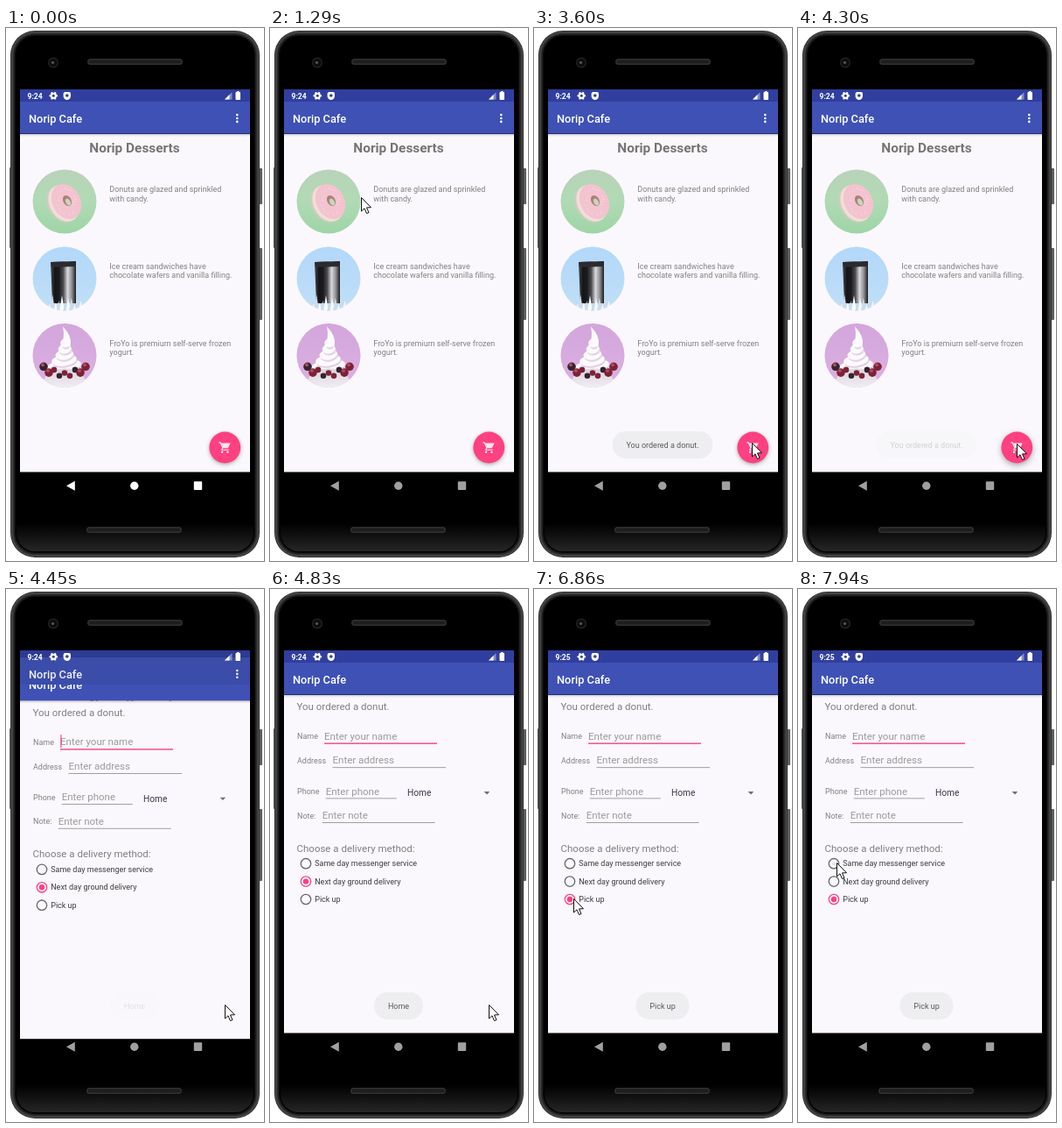
An HTML page with a canvas that plays this animation: 295 px wide and 608 px high, repeating every 8 s.

```html
<!DOCTYPE html>
<html lang="en">
<head>
<meta charset="utf-8">
<title>Dessert order</title>
<style>
html, body { margin: 0; width: 100%; height: 100%; overflow: hidden; background: #fff; }
canvas { display: block; width: 295px; height: 608px; }
</style>
</head>
<body>
<canvas id="c"></canvas>
<script>
const W = 295, H = 608, LOOP = 8000, TAU = Math.PI * 2;
const cv = document.getElementById('c'), g = cv.getContext('2d');
const dpr = window.devicePixelRatio || 1;
cv.width = W * dpr;
cv.height = H * dpr;

const PINK = '#ff4081', PAGE = '#faf8fc', GREY = '#808080', HINT = '#9b9b9b', NAVY = '#303f9f';
const ramp = (t, a, b) => Math.min(1, Math.max(0, (t - a) / (b - a)));
const mix = (a, b, k) => a + (b - a) * k;
const easeOut = k => 1 - (1 - k) ** 2.1;
const grey = v => `rgb(${v},${v},${v})`;

function rect(x, y, w, h, c) { g.fillStyle = c; g.fillRect(x, y, w, h); }

function round(x, y, w, h, r, c) {
  g.beginPath();
  g.roundRect(x, y, w, h, r);
  g.fillStyle = c;
  g.fill();
}

function oval(x, y, rx, ry, a, c) {
  g.beginPath();
  g.ellipse(x, y, rx, ry, a, 0, TAU);
  g.fillStyle = c;
  g.fill();
}

const dot = (x, y, r, c) => oval(x, y, r, r, 0, c);

function poly(pts, c) {
  g.beginPath();
  for (let i = 0; i < pts.length; i += 2) g.lineTo(pts[i], pts[i + 1]);
  g.closePath();
  g.fillStyle = c;
  g.fill();
}

function text(s, x, y, size, c, weight = 400, align = 'left') {
  g.font = `${weight} ${size}px Roboto, sans-serif`;
  g.textAlign = align;
  g.fillStyle = c;
  g.fillText(s, x, y);
}

function shade(x0, y0, x1, y1, ...cols) {
  const s = g.createLinearGradient(x0, y0, x1, y1);
  cols.forEach((c, i) => s.addColorStop(i / (cols.length - 1), c));
  return s;
}

function at(x, y, paint, scale = 1) {
  g.save();
  g.translate(x, y);
  g.scale(scale, scale);
  paint();
  g.restore();
}

function drawSpeaker(x, y) {
  round(x, y, 109, 7, 3.5, '#303030');
  round(x + 1.5, y + 1.5, 106, 4, 2, '#1e1e1e');
}

function drawPhone() {
  rect(0, 0, W, H, '#fff');
  round(288, 160, 5, 41, 1, '#5c6061');
  round(288, 251, 5, 82, 1, '#5c6061');
  round(4, 159, 4, 92, 1, '#5c6061');
  // rim fading into the black face
  for (let i = 0; i < 7; i++)
    round(5 + i, 3 + i, 285 - 2 * i, 601 - 2 * i, 28 - i, grey(i ? 90 - 15 * i : 48));
  round(12, 10, 271, 587, 21, shade(0, 565, 0, 597, '#000', '#262626'));
  drawSpeaker(93, 35);
  drawSpeaker(92, 569);
  dot(54, 39.5, 6, '#222');
  dot(54, 39.5, 4.6, '#0c0c0e');
  dot(53.5, 39.5, 1.8, '#4a4c52');
  rect(16, 70, 263, 470, '#000');
}

function drawBar(menu) {
  rect(16, 121, 263, 385.5, PAGE);
  rect(16, 120, 263, 4, shade(0, 120, 0, 124, 'rgba(0,0,0,.22)', 'rgba(0,0,0,0)'));
  rect(16, 60, 263, 24, NAVY);
  rect(16, 84, 263, 36.6, '#3f51b5');
  text('Norip Cafe', 26, 107.6, 12.8, '#fff', 500);
  if (menu) for (let i = -1; i < 2; i++) dot(264.3, 103 + 3.9 * i, 1.3, '#fff');
}

function disc(y, c, art) {
  g.save();
  g.beginPath();
  g.arc(67, y, 36.5, 0, TAU);
  g.clip();
  rect(30, y - 37, 74, 74, c);
  at(67, y, art);
  g.restore();
}

function donut() {
  oval(-3, 3, 16, 22, -0.5, '#d9c9bd');
  oval(-1, 2, 16, 22, -0.5, '#efe0da');
  oval(2, 0, 16, 21, -0.5, '#f3c3cf');
  oval(3, -1, 4.5, 6.5, -0.5, '#a98079');
  oval(4, 0.5, 2.6, 4.2, -0.5, '#c4d8bd');
  for (let i = 0; i < 16; i++) {
    const a = i * 2.4, k = 0.6 + (i % 4) * 0.09;
    dot(2 + Math.cos(a) * 15 * k, Math.sin(a) * 18 * k, 0.7, '#f9dfe6');
  }
}

function sandwich() {
  poly([-16, -19, 13, -20, 13, 28, -14, 28],
    shade(-16, 0, 13, 0, '#4a4a4e', '#151517', '#1b1b1d', '#4c4c50', '#d9dadd', '#8f9094', '#1c1c1f'));
  poly([-16, -19, 13, -20, 13, -14, -15, -13], '#2b2b2f');
  for (let i = 0; i < 12; i++) {
    const x = -21 + i * 3.6, top = 24 + 6 * Math.sin(i * 2.3);
    poly([x - 3, 38, x, top, x + 3, 38], i % 2 ? '#f6faff' : '#cfdbe6');
  }
}

function froyo() {
  for (let i = 0; i < 5; i++) {
    const y = 12 - i * 6.5, r = 20 * 0.72 ** i;
    oval(i * 0.4, y + 2, r, 7 - i * 0.5, -0.15, '#e0d3e3');
    oval(i * 0.4 - 1, y, r, 7 - i * 0.5, -0.15, '#fcfafc');
  }
  g.beginPath();
  g.moveTo(-5, -10);
  g.quadraticCurveTo(1, -20, -2, -33);
  g.quadraticCurveTo(10, -20, 6, -10);
  g.fillStyle = '#fcfafc';
  g.fill();
  oval(0, 28, 23, 13, 0, shade(0, 18, 0, 38, '#ded6e0', '#f3eff4'));
  for (let i = 0; i < 9; i++) {
    const x = -24 + i * 6, big = Math.abs(x) > 14;
    dot(x, 20 - Math.abs(x) * 0.3 + (i % 2) * 5, big ? 4.8 : 3.3, i % 3 ? '#7c2237' : '#35232f');
    if (big) dot(x - 1, 18 - Math.abs(x) * 0.3 + (i % 2) * 5, 2, '#b2485a');
  }
}

function cart() {
  g.strokeStyle = '#ffe6ee';
  g.lineWidth = 1.8;
  g.beginPath();
  g.moveTo(1, 3);
  g.lineTo(4, 3);
  g.lineTo(8.2, 12);
  g.lineTo(6.5, 16);
  g.lineTo(19, 16);
  g.stroke();
  poly([5, 4, 22, 4, 17.5, 13, 9, 13], '#ffe6ee');
  dot(7, 20, 2, '#ffe6ee');
  dot(17, 20, 2, '#ffe6ee');
}

function drawFab(press) {
  g.save();
  g.shadowColor = 'rgba(0,0,0,.32)';
  g.shadowBlur = (4 + 2 * press) * dpr;
  g.shadowOffsetY = (1.5 + press) * dpr;
  dot(250.3, 478.5, 17.9, PINK);
  g.restore();
  at(242.6, 471, cart, 0.64);
}

function drawMenuPage(t) {
  drawBar(true);
  text('Norip Desserts', 147, 142, 15.4, '#757575', 700, 'center');
  disc(198, shade(0, 162, 0, 234, '#b9d3ba', '#b0dab4', '#9fd5a7'), donut);
  disc(286, shade(0, 250, 0, 322, '#b3d8fa', '#c0def6'), sandwich);
  disc(373.5, shade(0, 337, 0, 410, '#d3a6dc', '#dcb0e2'), froyo);
  const blurbs = [
    'Donuts are glazed and sprinkled', 'with candy.',
    'Ice cream sandwiches have', 'chocolate wafers and vanilla filling.',
    'FroYo is premium self-serve frozen', 'yogurt.'];
  blurbs.forEach((s, i) => text(s, 118.3, Math.round(187 + (i >> 1) * 87.8 + (i % 2) * 10.6), 9, GREY));
  drawFab(ramp(t, 4000, 4250));
}

function field(label, hint, x, y, w, hot) {
  text(label, 31, y, 9, GREY);
  text(hint, x, y + 0.3, 11.5, HINT);
  rect(x, y + 4.3, w, hot ? 1.4 : 0.8, hot ? PINK : '#8a8a8a');
}

function radio(label, row, on, wave) {
  const y = 313.2 + row * 20.4, c = on > 0 ? PINK : '#686868';
  if (wave > 0 && wave < 1)
    dot(41, y, 12 * Math.min(1, wave * 2), `rgba(0,0,0,${0.08 * Math.min(1, 2 - 2 * wave)})`);
  g.beginPath();
  g.arc(41, y, 5.7, 0, TAU);
  g.lineWidth = 1.3;
  g.strokeStyle = c;
  g.stroke();
  if (on > 0) dot(41, y, 3.2 * on, c);
  text(label, 51.2, y + 3.2, 9, '#3d3d42');
}

function drawOrderPage(t) {
  drawBar(false);
  text('You ordered a donut.', 30.5, 138, 11.5, GREY);
  field('Name', 'Enter your name', 62, 171.2, 129, true);
  field('Address', 'Enter address', 71.5, 199, 129.5);
  field('Phone', 'Enter phone', 63.7, 234.2, 81);
  field('Note:', 'Enter note', 59.7, 261.8, 129);
  if (Math.floor((t - 5770) / 523) % 2) rect(62.3, 159.5, 1.2, 15, PINK);
  text('Home', 157, 236, 10.2, '#38384a');
  poly([244.7, 231, 251.3, 231, 248, 234.4], '#707070');
  text('Choose a delivery method:', 30.5, 299.8, 11.5, GREY);
  const pick = ramp(t, 6160, 6300);
  radio('Same day messenger service', 0, 0, ramp(t, 7850, 9000));
  radio('Next day ground delivery', 1, pick > 0 ? 0 : 1, 0);
  radio('Pick up', 2, pick, ramp(t, 6070, 6650));
}

function toast(s, start, end) {
  const a = ramp(start, 0, 1) && ramp(now, start, start + 300) * (1 - ramp(now, end, end + 330));
  if (a <= 0) return;
  g.save();
  g.globalAlpha = a;
  g.font = '400 9px Roboto, sans-serif';
  const w = g.measureText(s).width + 31.5;
  round(147 - w / 2, 460, w, 31, 15, '#eeedef');
  text(s, 147, 479, 9, '#5a5a5c', 400, 'center');
  g.restore();
}

function drawStatus(t) {
  text(t < 5300 ? '9:24' : '9:25', 24.5, 80.5, 8.6, '#fff', 700);
  for (let i = 0; i < 6; i++) dot(54.3 + 3.6 * Math.cos(i * TAU / 6), 77.3 + 3.6 * Math.sin(i * TAU / 6), 1.2, '#fff');
  dot(54.3, 77.3, 3.6, '#fff');
  dot(54.3, 77.3, 1.5, NAVY);
  round(65.6, 73, 8.4, 9, [2, 2, 4.2, 4.2], '#fff');
  dot(69.8, 77, 1.8, NAVY);
  poly([258.5, 73, 258.5, 81.5, 250, 81.5], 'rgba(255,255,255,.4)');
  poly([255.5, 76, 255.5, 81.5, 250, 81.5], '#fff');
  round(262.5, 73, 5.5, 9, 0.8, '#fff');
  rect(264, 72, 2.5, 1.5, '#fff');
}

function drawNav(t) {
  const c = grey(Math.round(mix(255, 160, ramp(t, 100, 560))));
  poly([69, 522.3, 78.8, 516.8, 78.8, 527.8], c);
  dot(146.8, 522.2, 4.7, c);
  round(214.8, 517.3, 9.4, 9.6, 0.8, c);
}

// pointer moves: start time, end time, tip at the end
const MOVES = [
  [520, 1290, 104, 193], [1290, 1560, 62, 174], [1560, 1820, 74, 186],
  [2400, 3700, 250, 474], [4860, 5770, 45, 353], [7120, 7710, 44, 312]];

function drawPointer(t) {
  if (t < MOVES[0][0]) return;
  let x = 225, y = 574;
  for (const [a, b, mx, my] of MOVES) {
    const k = easeOut(ramp(t, a, b));
    x = mix(x, mx, k);
    y = mix(y, my, k);
  }
  at(Math.round(x) + 0.5, Math.round(y) + 0.5, () => {
    poly([0, 0, 0, 15.5, 3.5, 12.3, 6, 18, 8.5, 17, 6, 11.4, 11, 11.2], '#fff');
    g.lineWidth = 1;
    g.strokeStyle = '#111';
    g.stroke();
  });
}

function slide(t) {
  const p = ramp(t, 4370, 4795), knee = 1 / 6;
  return p < knee ? 0.4 * (p / knee) ** 2.5 : 1 - 0.6 * Math.exp((knee - p) / 0.045);
}

function drawPages(t) {
  const e = slide(t), left = e > 0.99 ? 0 : 1 - e;
  g.save();
  g.beginPath();
  g.rect(16, 70, 263, 470);
  g.clip();
  if (left) {
    at(0, -9.4 * e, () => drawMenuPage(t));
    if (e > 0) rect(16, 70, 263, 437, `rgba(0,0,0,${0.1 * e})`);
  }
  if (e > 0) {
    g.beginPath();
    g.rect(16, 70 + 19 * left + 437 * left ** 2.5, 263, 470);
    g.clip();
    at(0, 19 * left, () => drawOrderPage(t));
  }
  g.restore();
}

let now = 0;

function tick() {
  now = performance.now() % LOOP;
  g.setTransform(dpr, 0, 0, dpr, 0, 0);
  drawPhone();
  drawPages(now);
  drawStatus(now);
  drawNav(now);
  toast('You ordered a donut.', 1970, 4050);
  toast('Home', 4410, 6090);
  toast('Pick up', 6390, LOOP);
  drawPointer(now);
  requestAnimationFrame(tick);
}
tick();
</script>
</body>
</html>
```
